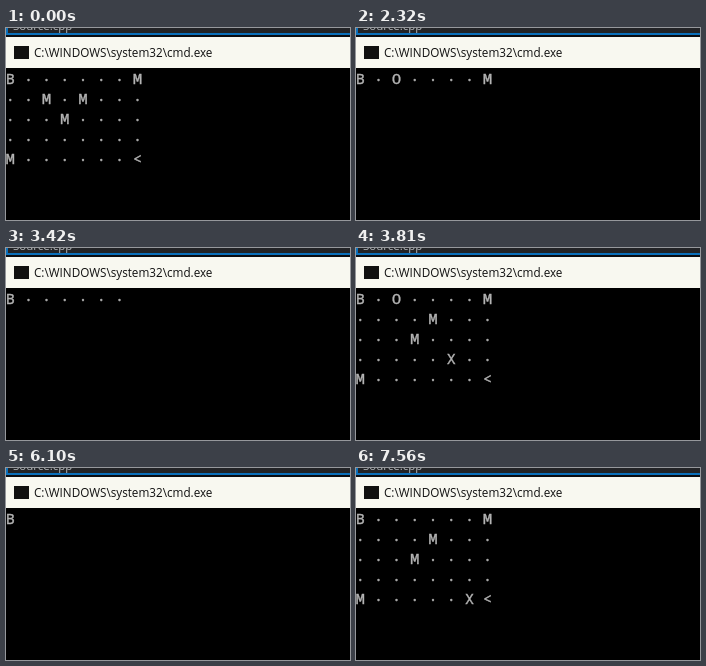
These frames come from a looping animation (344x192 px, 8000 ms). An HTML page with a canvas:

```html
<!DOCTYPE html>
<html lang="en">
<head>
<meta charset="utf-8">
<title>Console grid game</title>
<style>
  html, body { margin: 0; width: 100%; height: 100%; overflow: hidden; background: #000; }
  canvas { display: block; width: 100vw; height: 100vh; }
</style>
</head>
<body>
<canvas id="stage" width="344" height="192"></canvas>
<script>
const ctx = document.getElementById('stage').getContext('2d', { alpha: false });
const LOOP = 8000;
const COLS = 8;
const ROWS = 5;
const DOT = '·';
const UI_FONT = '"Open Sans", "Noto Sans", sans-serif';
const MONO_FONT = '"Noto Sans Mono", "DejaVu Sans Mono", monospace';

// Fixed pieces as [row, column, glyph]
const pieces = [[0, 0, 'B'], [0, 7, 'M'], [1, 4, 'M'], [2, 3, 'M'], [4, 0, 'M'], [4, 7, '<']];
const rock = [1, 2, 'M'];
const player = (row, col) => [row, col, 'O'];
const enemy = (row, col) => [row, col, 'X'];

// cells: how many cells the console has printed so far
const steps = [
  { at: 0, extra: [rock] },
  { at: 460, extra: [rock, player(0, 1), enemy(0, 6)] },
  { at: 1320, extra: [rock, player(0, 1)] },
  { at: 2320, extra: [rock, player(0, 2)], cells: COLS },
  { at: 2520, extra: [rock, player(0, 2)] },
  { at: 3420, extra: [player(1, 2)], cells: 7 },
  { at: 3550, extra: [player(1, 2)] },
  { at: 3810, extra: [player(0, 2), enemy(3, 5)] },
  { at: 4310, extra: [player(0, 2)], cells: COLS },
  { at: 4570, extra: [player(0, 2)] },
  { at: 6100, extra: [player(0, 1)], cells: 1 },
  { at: 6160, extra: [player(0, 1)] },
  { at: 7560, extra: [enemy(4, 6)] }
];

function rect(color, x, y, w, h) {
  ctx.fillStyle = color;
  ctx.fillRect(x, y, w, h);
}

function text(str, x, y, font, color, align = 'left') {
  ctx.font = font;
  ctx.fillStyle = color;
  ctx.textAlign = align;
  ctx.fillText(str, x, y);
}

function drawWindow() {
  rect('#000', 0, 0, 344, 192);
  // Editor strip behind the console
  rect('#222326', 0, 0, 344, 5);
  text('Source.cpp', 7, 1.5, `11.5px ${UI_FONT}`, '#b4b8bc');
  rect('#0a70bb', 0, 0, 2, 5);
  rect('#0a70bb', 0, 5, 344, 2);
  rect('#0a0d12', 0, 7, 344, 2);
  // Title bar
  rect('#f8f8f0', 0, 9, 344, 31);
  rect('#101010', 8, 18, 15, 13);
  text('C:\\WINDOWS\\system32\\cmd.exe', 28, 29, `11.7px ${UI_FONT}`, '#101010');
}

function drawGlyph(glyph, row, col) {
  const x = 4.2 + col * 18.2;
  const y = 56 + row * 20 + (glyph === DOT ? 1 : 0);
  text(glyph, x, y, `15px ${MONO_FONT}`, '#b4b4b4', 'center');
  // A thin outline gives the heavier console weight
  ctx.strokeStyle = '#b4b4b4';
  ctx.lineWidth = 0.4;
  ctx.strokeText(glyph, x, y);
}

function drawBoard({ extra, cells = COLS * ROWS }) {
  const grid = Array(COLS * ROWS).fill(DOT);
  for (const [row, col, glyph] of [...pieces, ...extra]) grid[row * COLS + col] = glyph;
  grid.slice(0, cells).forEach((glyph, i) => drawGlyph(glyph, Math.floor(i / COLS), i % COLS));
}

function frame() {
  const t = performance.now() % LOOP;
  drawWindow();
  drawBoard(steps.filter(step => step.at <= t).pop());
  requestAnimationFrame(frame);
}
frame();
</script>
</body>
</html>
```
